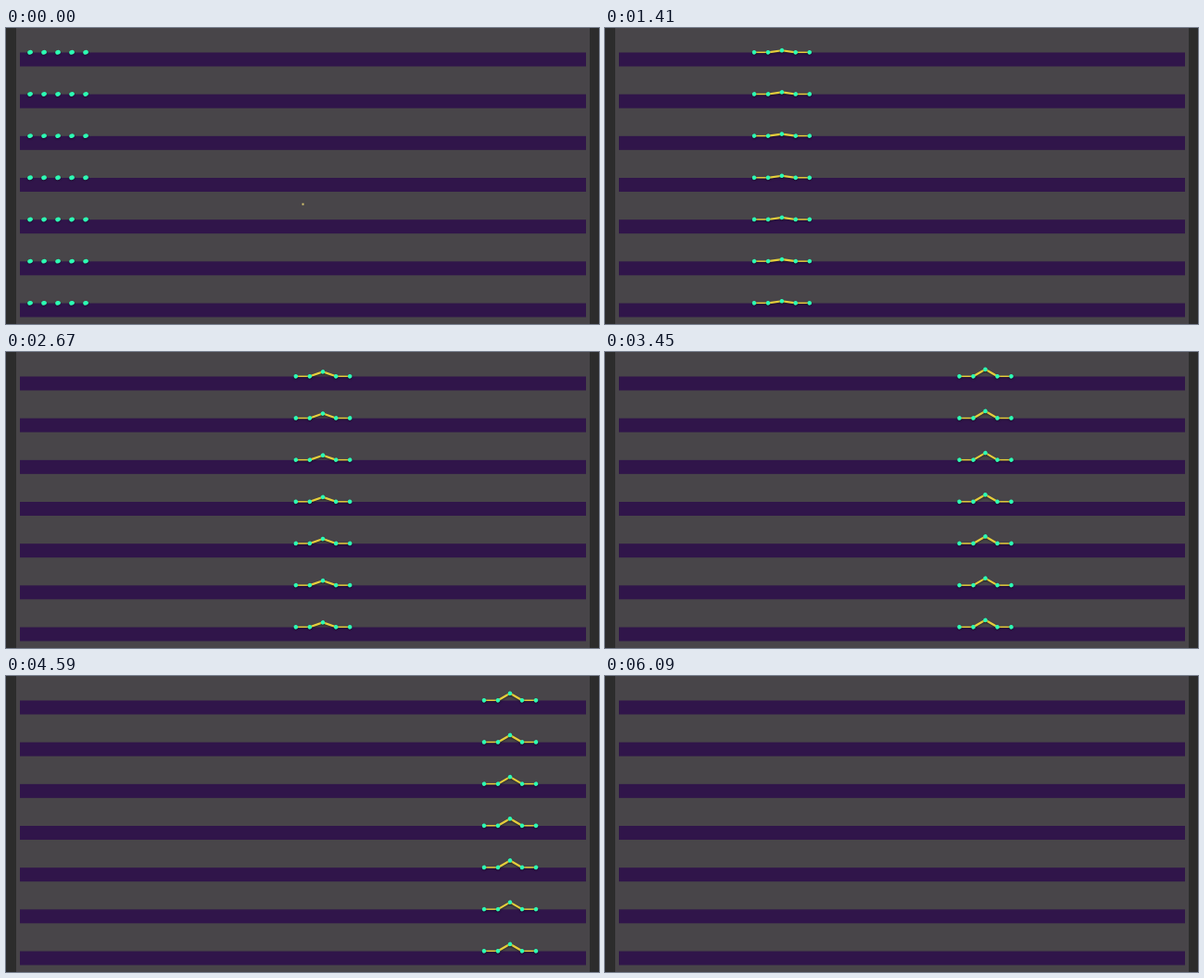
An HTML page with a canvas for the animation above (6780 ms loop, 640 by 320 pixels).

```html
<!DOCTYPE html>
<html>
<head>
<meta charset="utf-8">
<style>
html, body { margin: 0; width: 100%; height: 100%; overflow: hidden; background: #2c2c2c; }
canvas { display: block; }
</style>
</head>
<body>
<canvas id="stage" width="640" height="320"></canvas>
<script>
const ctx = document.getElementById('stage').getContext('2d');
const LOOP = 6780, TICK = 30, LAST_TICK = 189;
const ROWS = 7, SEG = 15;
const MAX_ANGLE = Math.PI / 4;

// Each crawl cycle runs from one step to the next: [tick, body centre]
const STEPS = [[-53, -41], [23, 82.5], [66, 250], [115, 410.5], [153, 544], [196, 657.7]];
const STEP_PHASE = 0.304;  // point of the hump wave where a step begins
const SURGE = 17.6;        // how far the body runs ahead within a cycle

function pose(tick) {
  const i = STEPS.findIndex(step => step[0] > tick);
  const [t0, x0] = STEPS[i - 1], [t1, x1] = STEPS[i];
  const u = (tick - t0) / (t1 - t0);
  const surge = SURGE * Math.sin(Math.PI * u ** (2 / 3));
  const wave = (1 - Math.cos(2 * Math.PI * (u + STEP_PHASE))) / 2;
  return { x: x0 + (x1 - x0) * u + surge, angle: MAX_ANGLE * wave };
}

const rowTop = row => 26.5 + row * 45.17;

function drawStage() {
  ctx.fillStyle = '#2c2c2c';
  ctx.fillRect(0, 0, 640, 320);
  ctx.fillStyle = '#484549';
  ctx.fillRect(11, 0, 619, 320);
  ctx.fillStyle = '#30154a';
  for (let r = 0; r < ROWS; r++) ctx.fillRect(15, rowTop(r), 611, 15);
}

function drawLine(points, width) {
  ctx.lineWidth = width;
  ctx.beginPath();
  for (const p of points) ctx.lineTo(...p);
  ctx.stroke();
}

function drawWorm(x, y, angle, atRest) {
  const half = SEG * Math.cos(angle), rise = SEG * Math.sin(angle);
  const points = [
    [x - half - SEG, y], [x - half, y], [x, y - rise], [x + half, y], [x + half + SEG, y]
  ];
  if (!atRest) {
    drawLine(points.slice(0, 2), 1.5);
    drawLine(points.slice(3), 1.5);
    drawLine(points.slice(1, 4), 2.2);
  }
  for (const [px, py] of points) {
    ctx.beginPath();
    ctx.ellipse(px, py, atRest ? 2.9 : 2.3, 2.3, -0.3, 0, 2 * Math.PI);
    ctx.fill();
  }
}

function draw(ms) {
  const tick = Math.floor(ms / TICK);
  drawStage();
  if (tick >= LAST_TICK) return;

  const { x, angle } = pose(tick);
  const atRest = tick === 0;
  ctx.save();
  ctx.beginPath();
  ctx.rect(11, 0, 621, 320);
  ctx.clip();
  ctx.strokeStyle = '#e6cf3c';
  ctx.fillStyle = '#2dfbb4';
  ctx.lineJoin = 'round';
  ctx.shadowColor = 'rgba(0, 0, 0, 0.4)';
  ctx.shadowBlur = 2;
  ctx.shadowOffsetY = 1;
  for (let r = 0; r < ROWS; r++) drawWorm(x, rowTop(r) - 0.2, angle, atRest);
  ctx.restore();

  if (atRest) {
    ctx.fillStyle = '#dccb72';
    ctx.fillRect(319.5, 189.5, 2, 2);
  }
}

const start = performance.now();
function loop() {
  draw((performance.now() - start) % LOOP);
  requestAnimationFrame(loop);
}
loop();
</script>
</body>
</html>
```
